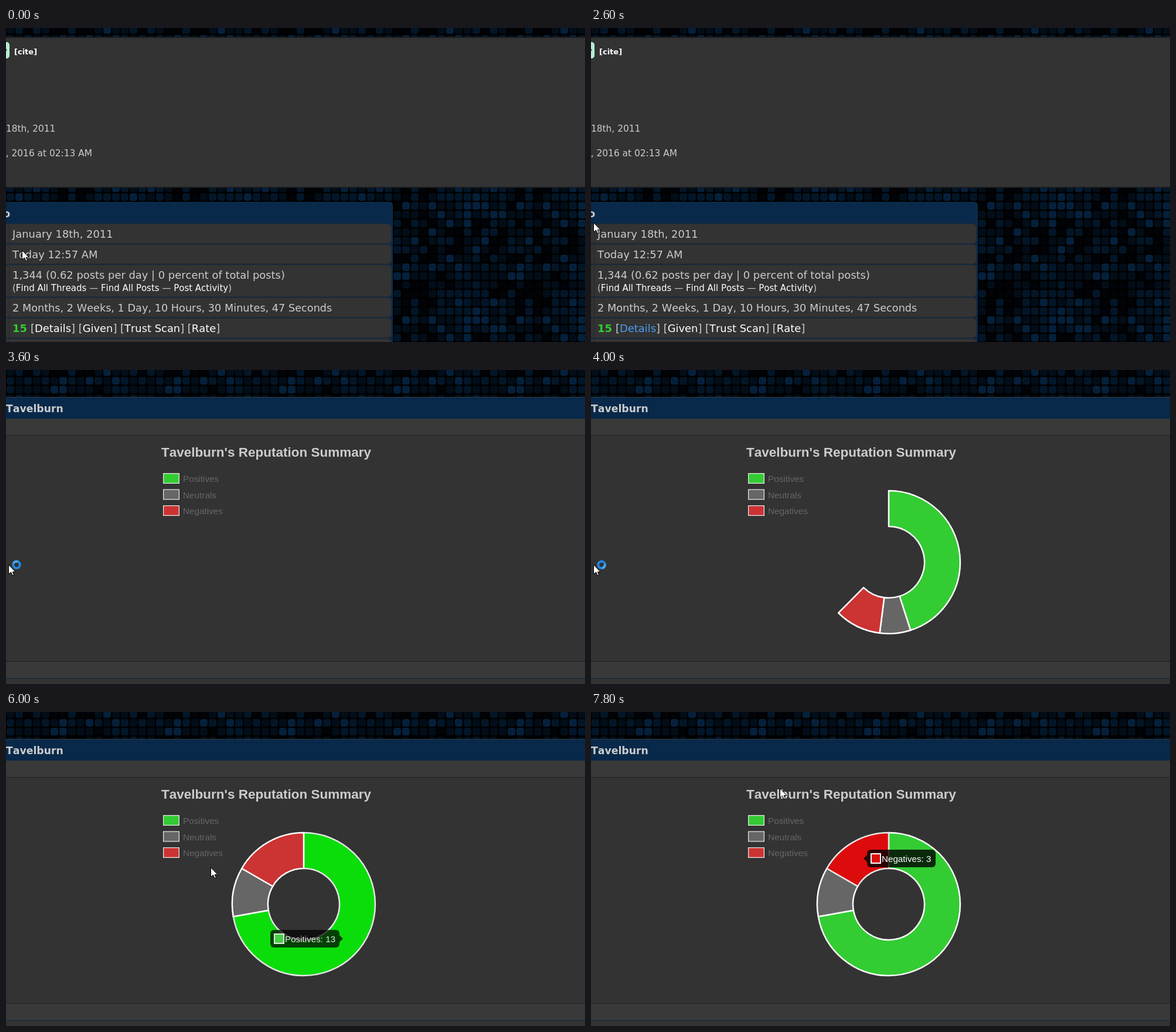
These frames come from a looping animation (988 by 536 pixels, 8000 ms). An HTML page with a canvas:

```html
<!DOCTYPE html>
<html lang="en">
<head>
<meta charset="utf-8">
<style>
  html, body { margin: 0; width: 100%; height: 100%; overflow: hidden; background: #000; }
  canvas { display: block; }
</style>
</head>
<body>
<canvas id="stage" width="988" height="536"></canvas>
<script>
const W = 988, H = 536, LOOP = 8000, STEP = 200;
const ctx = document.getElementById('stage').getContext('2d');
const NAVY = '#08294a', PANEL = '#333', BAR = '#393939', GRAY = '#ccc', LINK = '#fff', GREEN = '#3c3';
const UI = '"DejaVu Sans", sans-serif', CHART = '"Liberation Sans", Arial, sans-serif';
const USER = 'Tavelburn';

function rect(x, y, w, h, color) {
  ctx.fillStyle = color;
  ctx.fillRect(x, y, w, h);
}

function rounded(x, y, w, h, radii, color) {
  ctx.beginPath();
  ctx.roundRect(x, y, w, h, radii);
  ctx.fillStyle = color;
  ctx.fill();
}

function text(str, x, y, font, color, align = 'left') {
  ctx.font = font;
  ctx.fontKerning = 'none';
  ctx.fillStyle = color;
  ctx.textAlign = align;
  ctx.fillText(str, x, y);
  return x + ctx.measureText(str).width;
}

// Draws [string, color] pieces one after another.
function run(parts, x, y, font) {
  for (const [str, color] of parts) x = text(str, x, y, font, color);
}

// Repeating wallpaper of small rounded tiles.
const wallpaper = (() => {
  const cols = 13, rows = 13, cell = 15;
  const tile = document.createElement('canvas');
  tile.width = cols * cell;
  tile.height = rows * cell;
  const g = tile.getContext('2d');
  g.fillRect(0, 0, tile.width, tile.height);
  for (let i = 0; i < cols * rows; i++) {
    const noise = Math.abs(Math.sin((i + 5) * 12.9898) * 43758.5453) % 1;
    g.fillStyle = noise < .2 ? '#010306' : noise < .6 ? '#020d18' : noise < .84 ? '#031628' : '#05203b';
    g.beginPath();
    g.roundRect(i % cols * cell + 1, Math.floor(i / cols) * cell + 1, 13, 13, 4);
    g.fill();
  }
  const pattern = ctx.createPattern(tile, 'repeat');
  pattern.setTransform(new DOMMatrix().translate(0, -4));
  return pattern;
})();

function profilePage(t) {
  rect(0, 0, W, H, wallpaper);
  rect(0, 15, W, 258, '#1c1f22');
  rect(0, 17, W, 254, PANEL);
  rounded(-30, 24, 36, 28, 5, '#b5ecd3');
  text('y', 2, 44, `bold 14px ${UI}`, '#12323a', 'right');
  text('[cite]', 14, 45, `bold 13px ${UI}`, LINK);
  text('18th, 2011', 0, 177, `15.4px ${UI}`, GRAY);
  text(', 2016 at 02:13 AM', 147, 219, `15.4px ${UI}`, GRAY, 'right');

  rounded(-10, 297, 670, 260, [0, 6, 0, 0], '#0f3357');
  rounded(-10, 298, 669, 260, [0, 6, 0, 0], NAVY);
  text('Info', 7, 323, `bold 17.3px ${UI}`, GRAY, 'right');
  for (const [y, h] of [[334, 34], [369, 34], [404, 55], [460, 34], [495, 34], [530, 34]]) {
    rounded(-10, y, 668, h, [0, 6, 6, 0], '#2a2c2e');
    rounded(-10, y + 1, 667, h - 2, [0, 6, 6, 0], PANEL);
    rect(5, y, 1, h, '#1d2833');
  }

  const body = `17.9px ${UI}`;
  text('January 18th, 2011', 11, 358, body, GRAY);
  text('Today 12:57 AM', 11, 393, body, GRAY);
  text('1,344 (0.62 posts per day | 0 percent of total posts)', 11, 428, body, GRAY);
  run([['(', GRAY], ['Find All Threads', LINK], [' — ', GRAY], ['Find All Posts', LINK],
    [' — ', GRAY], ['Post Activity', LINK], [')', GRAY]], 11, 449, `15px ${UI}`);
  text('2 Months, 2 Weeks, 1 Day, 10 Hours, 30 Minutes, 47 Seconds', 11, 484, `17.7px ${UI}`, GRAY);
  text('15', 11, 519, `bold 17.9px ${UI}`, '#32cd32');
  const hovered = t >= 1000 && t !== 1400;
  run([['[', GRAY], ['Details', hovered ? '#4a9df0' : LINK], ['] [', GRAY], ['Given', LINK],
    ['] [', GRAY], ['Trust Scan', LINK], ['] [', GRAY], ['Rate', LINK], [']', GRAY]], 42, 519, body);
}

function ratingsFrame(top, bottom) {
  rect(0, 0, W, H, PANEL);
  rect(0, 0, W, 46, top);
  rect(0, 46, W, 1, '#34393e');
  rect(0, 47, W, 36, NAVY);
  text(USER, 0, 72, `bold 17.3px ${UI}`, GRAY);
  rect(0, 83, W, 28, BAR);
  rect(0, 111, W, 1, '#202020');
  rect(0, bottom, W, 1, '#202020');
  rect(0, bottom + 1, W, 28, BAR);
  rect(0, bottom + 29, W, 1, NAVY);
}

function commentsPage(t) {
  ratingsFrame(t < 3400 ? NAVY : wallpaper, 305);
  const comments = [
    ['+3', 'TO 100! +++++'],
    ['-3', 'LQ Insignificant peasent. I await the revenge rep like I give a shit lol.'],
    ['+3', 'Love that High Quality.'],
    ['+1', 'Never gonna post again on QV.'],
    ['+3', "A repfuck. That's harsh. Here's something for the recovery."],
  ];
  comments.forEach(([score, comment], i) => {
    const y = 362 + i * 38, bad = score[0] === '-';
    if (bad) text(`Negative (${score}):`, 7, y, `bold 17.8px ${UI}`, '#c33');
    else text(`Positive (${score}):`, 7, y, `17.8px ${UI}`, '#32cd32');
    text(comment, bad ? 153 : 135, y, `17.6px ${UI}`, GRAY);
    rect(0, y + 10, W, 1, NAVY);
  });
}

const slices = [
  { label: 'Positives', value: 13, color: GREEN, hover: '#0bdd0b', swatch: GREEN },
  { label: 'Neutrals', value: 2, color: '#666', hover: '#666', swatch: '#666' },
  { label: 'Negatives', value: 3, color: '#c33', hover: '#dd0c0c', swatch: '#dd0c0c' },
];

function donut(progress, active) {
  let angle = -Math.PI / 2;
  ctx.lineWidth = 2.5;
  ctx.lineJoin = 'round';
  slices.forEach((slice, i) => {
    const end = angle + slice.value / 18 * 2 * Math.PI * progress;
    ctx.beginPath();
    ctx.arc(508, 328, 122, angle, end);
    ctx.arc(508, 328, 61, end, angle, true);
    ctx.closePath();
    ctx.fillStyle = i === active ? slice.hover : slice.color;
    ctx.strokeStyle = i === active ? '#e6e6e6' : '#fff';
    ctx.fill();
    ctx.stroke();
    angle = end;
  });
}

// side: 1 puts the pointer on the right edge, -1 on the left.
function tooltip(slice, x, y, w, side, opacity) {
  const tip = side > 0 ? x + w : x;
  ctx.globalAlpha = opacity;
  rounded(x, y, w, 30, 6, 'rgba(0,0,0,.8)');
  ctx.beginPath();
  ctx.moveTo(tip, y + 9);
  ctx.lineTo(tip + side * 6, y + 15);
  ctx.lineTo(tip, y + 21);
  ctx.fill();
  rect(x + 6, y + 6, 18, 18, '#fff');
  rect(x + 8, y + 8, 14, 14, slice.swatch);
  text(`${slice.label}: ${slice.value}`, x + 25, y + 21, `15.2px ${CHART}`, '#fff');
  ctx.globalAlpha = 1;
}

function chartPage(t) {
  ratingsFrame(wallpaper, 497);
  text(`${USER}'s Reputation Summary`, 444, 148, `bold 22.5px ${CHART}`, GRAY, 'center');
  slices.forEach((slice, i) => {
    const y = 176 + i * 27.5;
    rect(268, y, 28, 18, '#e8e8e8');
    rect(269.25, y + 1.25, 25.5, 15.5, slice.color);
    text(slice.label, 302, y + 15, `15.3px ${CHART}`, '#666');
  });
  const time = Math.min(1, Math.max(0, (t - 3783) / 1000));
  const progress = 1 - (1 - time) ** 4;
  const active = t >= 5800 && t < 6200 ? 0 : t >= 7200 ? 2 : -1;
  if (progress) donut(progress, active);
  if (active === 0) tooltip(slices[0], 451, 372, 118, 1, t < 6000 ? .7 : .88);
  if (active === 2) tooltip(slices[2], 471, 235, 117, -1, t < 7400 ? .6 : 1);
}

// [time, x, y]; a lone time hides the pointer.
const pointerPath = [
  [0, 27, 379], [200], [1400, 70, 500], [1600, 52, 430], [1800, 25, 350], [2000, 9, 291], [2200],
  [2600, 4, 332], [4800, 30, 322], [5000, 90, 295], [5200, 143, 272], [5400, 227, 268],
  [5600, 400, 330], [5800, 560, 380], [6000, 349, 265], [6800, 385, 285], [7000, 420, 285],
  [7200, 450, 262], [7400, 455, 245], [7600, 410, 230], [7800, 322, 130],
];

function pointer(t) {
  const [, x, y] = pointerPath.findLast(([time]) => time <= t);
  if (x === undefined) return;
  ctx.save();
  ctx.translate(x + .5, y + .5);
  if (t >= 3200 && t < 5400) {
    ctx.lineWidth = 4;
    ctx.strokeStyle = '#2486de';
    ctx.beginPath();
    ctx.arc(13.5, 0, 5.8, 0, 2 * Math.PI);
    ctx.stroke();
    ctx.strokeStyle = '#46a8f2';
    ctx.beginPath();
    ctx.arc(13.5, 0, 5.8, t / 160, t / 160 + 1.5);
    ctx.stroke();
  }
  ctx.fillStyle = '#fff';
  ctx.strokeStyle = '#000';
  ctx.lineWidth = 1;
  ctx.lineJoin = 'miter';
  const arrow = new Path2D('M0 0V16L4 12.5L6.5 18H9L6.8 12H11.5Z');
  ctx.fill(arrow);
  ctx.stroke(arrow);
  ctx.restore();
}

function draw() {
  const t = Math.floor(performance.now() % LOOP / STEP) * STEP;
  if (t < 3200) profilePage(t);
  else if (t < 3600) commentsPage(t);
  else chartPage(t);
  pointer(t);
  requestAnimationFrame(draw);
}
draw();
</script>
</body>
</html>
```
